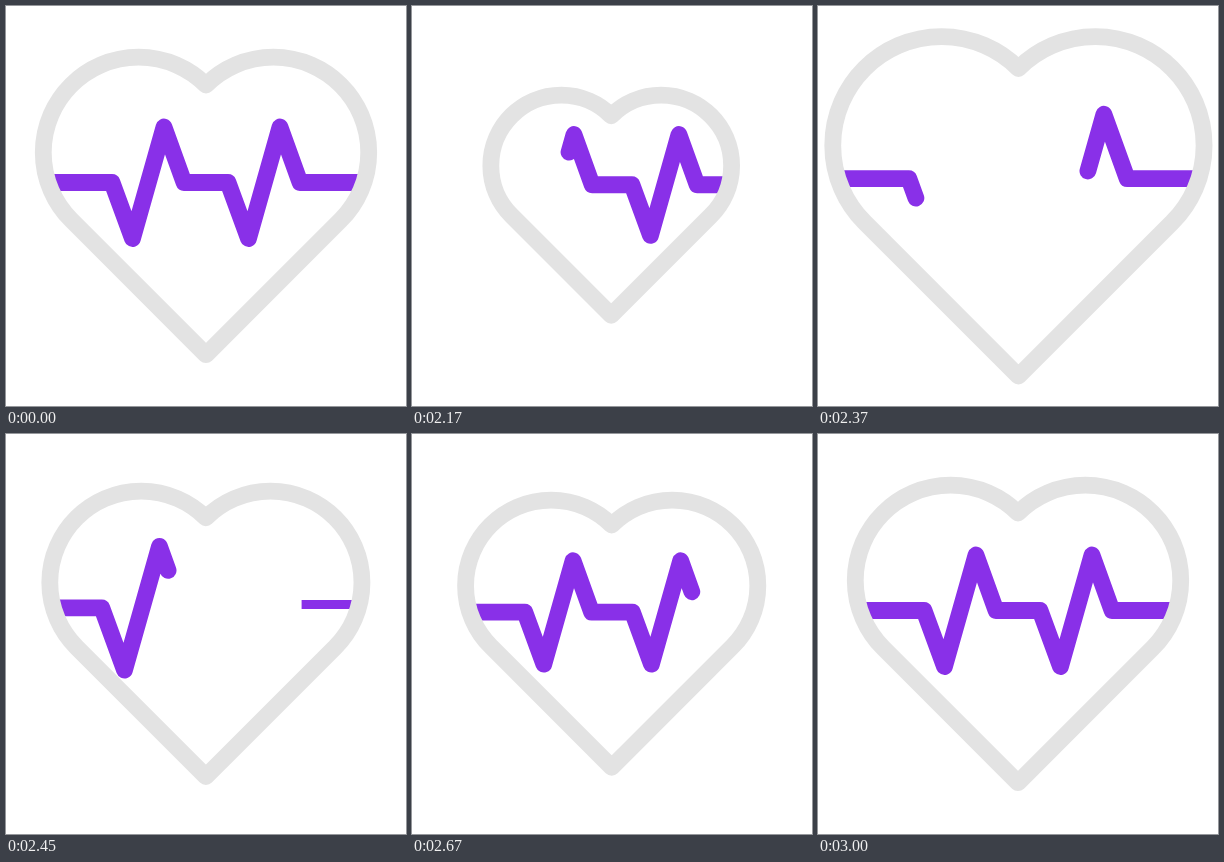
Animation, 400 px wide and 400 px high, one loop 3020 ms. Source, as an HTML page:

```html
<!DOCTYPE html>
<html lang="en">
<head>
<meta charset="utf-8">
<title>Heartbeat</title>
<style>
  html, body { margin: 0; width: 100%; height: 100%; overflow: hidden; background: #fff; }
  svg { display: block; width: 100%; height: 100%; }
  path { fill: none; stroke-linecap: round; stroke-linejoin: round; }
  #pulse path { stroke: #8930e8; }
  #pulse #sliver { stroke-width: 8.2; stroke-linecap: butt; }
  #heart { stroke: #e3e3e3; }
</style>
</head>
<body>
<svg viewBox="0 0 400 400">
  <clipPath id="inside"><path id="mask"/></clipPath>
  <g clip-path="url(#inside)">
    <g id="pulse">
      <path id="leaving"/>
      <path id="sliver"/>
      <path id="arriving"/>
    </g>
  </g>
  <path id="heart"/>
</svg>
<script>
const LOOP = 3020, START = 2020, LINE = 16.8;
const [pulse, leaving, sliver, arriving, heart, mask] =
  ['pulse', 'leaving', 'sliver', 'arriving', 'heart', 'mask'].map(id => document.getElementById(id));

const heartShape = 'M200 79.1A95.3 95.3 0 0 0 65.2 213.9L200 348.7L334.8 213.9A95.3 95.3 0 0 0 200 79.1Z';
const beat = x => `L${x} 176.5L${x + 20.5} 232.5L${x + 52} 121L${x + 72} 176.5`;
const pulseShape = `M38 176.5${beat(106)}${beat(222)}L362 176.5`;

heart.setAttribute('d', heartShape);
mask.setAttribute('d', heartShape);
leaving.setAttribute('d', pulseShape);
arriving.setAttribute('d', pulseShape);
const length = leaving.getTotalLength();

const clamp = v => Math.min(1, Math.max(0, v));
const sine = u => (1 - Math.cos(Math.PI * u)) / 2;

function bezier(x1, y1, x2, y2) {
  const at = (a, b, s) => 3 * (1 - s) ** 2 * s * a + 3 * (1 - s) * s * s * b + s ** 3;
  return u => {
    let lo = 0, hi = 1;
    for (let i = 0; i < 24; i++) {
      const mid = (lo + hi) / 2;
      if (at(x1, x2, mid) < u) lo = mid; else hi = mid;
    }
    return at(y1, y2, (lo + hi) / 2);
  };
}

// Each key is [time, value, easing towards this value].
const heartKeys = [
  [2020, 1], [2218, 0.7, sine], [2370, 1.141, sine], [2552, 0.702, sine],
  [3000, 1, bezier(0.15, 0, 0, 1)]
];
const pulseKeys = [
  [2020, 1], [2170, 0.905, sine], [2388, 1.165, sine], [2590, 0.91, sine],
  [3000, 1, bezier(0.3, 0, 0.25, 1)]
];
const drawEase = bezier(0.22, 0.125, 0.19, 1);

function valueAt(keys, t) {
  for (let i = 1; i < keys.length; i++) {
    const [t0, v0] = keys[i - 1], [t1, v1, ease] = keys[i];
    if (t < t1) return v0 + (v1 - v0) * ease(clamp((t - t0) / (t1 - t0)));
  }
  return keys[keys.length - 1][1];
}

// Scales about the point (c, c) while the line keeps its weight.
function scaleAbout(el, c, s) {
  el.setAttribute('transform', `translate(${c} ${c}) scale(${s}) translate(${-c} ${-c})`);
  el.setAttribute('stroke-width', LINE / s);
}

const show = (el, on) => el.setAttribute('visibility', on ? 'visible' : 'hidden');

function render(t) {
  const heartScale = valueAt(heartKeys, t);
  scaleAbout(heart, 197, heartScale);
  scaleAbout(mask, 197, heartScale);
  scaleAbout(pulse, 200, valueAt(pulseKeys, t));

  const tail = t < START ? 0 : 1.24 * (t - 1991);
  leaving.setAttribute('stroke-dasharray', `${length} ${length}`);
  leaving.setAttribute('stroke-dashoffset', -tail);
  show(leaving, t < 2440);

  // The last flat stretch leaves as a thin line.
  const sliverX = 285 + 1.24 * (t - 2450);
  sliver.setAttribute('d', `M${sliverX} 173.4H362`);
  show(sliver, t >= 2440 && sliverX < 362);

  const head = length * drawEase(clamp((t - 2300) / 700));
  arriving.setAttribute('stroke-dasharray', `${head} ${length * 2}`);
  show(arriving, t > 2300);
}

const origin = performance.now();
function tick() {
  render((performance.now() - origin) % LOOP);
  requestAnimationFrame(tick);
}
tick();
</script>
</body>
</html>
```
